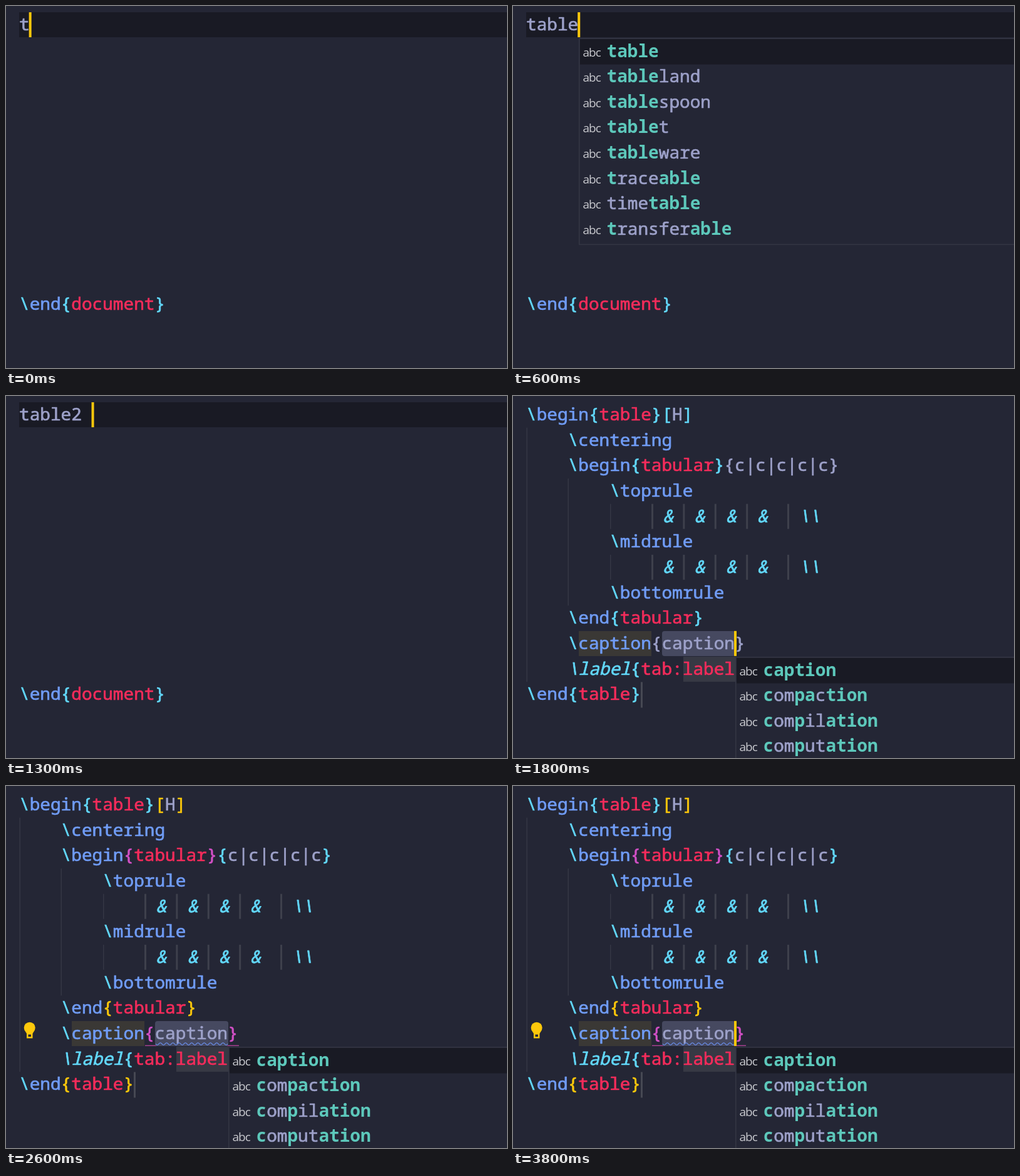
Recreate the animation shown at these times as an HTML page with a canvas. Size 800 by 579 pixels, loop 3.9 s.

```html
<!DOCTYPE html>
<html lang="en">
<head>
<meta charset="utf-8">
<title>Snippet expansion</title>
<style>
html, body { margin: 0; width: 100%; height: 100%; overflow: hidden; background: #242635; }
canvas { display: block; }
</style>
</head>
<body>
<canvas id="stage" width="800" height="579"></canvas>
<script>
const ctx = document.getElementById('stage').getContext('2d');
const LOOP = 3900, LEFT = 21, CELL = 16.65, LINE = 40.65;
const MONO = '27.75px "Noto Sans Mono", "DejaVu Sans Mono", monospace';
const BG = '#242635', DARK = '#191a24', TEXT = '#9da1c9', TEAL = '#5dc8bb', GOLD = '#fdc80b';
const CYAN = '#62d8fa', BLUE = '#709cf6', RED = '#f42c5b', PINK = '#d250c6';
const GUIDE = '#343645', STOP = '#3e404c', ICON = '#c9cacf';

const TYPED = [[0, 't'], [200, 'ta'], [300, 'tab'], [500, 'tabl'], [600, 'table'], [1000, 'table2'], [1200, 'table2 ']];
const POPUP_AT = 100, EXPAND = 1600, SUGGEST = 1700, COLOUR = 2200, LINT = 2400, BLINK = 500;

// Capitals mark the matched letters; a leading * gives the wrench icon.
const HITS = {
  t: 'Table Tableland Tablespoon Tablet Tableware Tabsize *abs Taxicab Traceable Tobacco Timetable Tribal',
  ta: 'TAble TAbleland TAblespoon TAblet TAbleware TAbsize TAxicab TrAceable TobAcco timeTAble TribAl TrAnsferable',
  tab: 'TABle TABleland TABlespoon TABlet TABleware TABsize *ABs TAxicaB TraceABle ToBAcco timeTABle TriBAl',
  tabl: 'TABLe TABLeland TABLespoon TABLet TABLeware TraceABLe timeTABLe TransferABLe',
  table: 'TABLE TABLEland TABLEspoon TABLEt TABLEware TraceABLE timeTABLE TransferABLE',
  caption: 'CAPTION ComPAcTION ComPilATION ComPutATION'
};

// Each piece starts with a colour key; pieces are split by ~.
const END_DOC = 'c\\~bend~c{~rdocument~c}';
const SNIPPET = [
  [0, 'c\\~bbegin~c{~rtable~c}~Y[~tH~Y]'],
  [4, 'c\\~bcentering'],
  [4, 'c\\~bbegin~M{~rtabular~M}~N{~tc|c|c|c|c~N}'],
  [8, 'c\\~btoprule'],
  null,
  [8, 'c\\~bmidrule'],
  null,
  [8, 'c\\~bbottomrule'],
  [4, 'c\\~bend~Y{~rtabular~Y}'],
  [4, 'c\\~bcaption~P{~tcaption~P}'],
  [4, 'C\\~Blabel~c{~rtab:label'],
  [0, 'c\\~bend~Y{~rtable~Y}']
];

const colX = col => LEFT + CELL * col;
const rowY = row => 10 + LINE * row;

function rect(x, y, w, h, fill) {
  ctx.fillStyle = fill;
  ctx.fillRect(x, y, w, h);
}

// Regular and italic text gets a thin outline for a medium weight.
function write(str, x, y, fill, style = '400') {
  ctx.font = style + ' ' + MONO;
  ctx.fillStyle = ctx.strokeStyle = fill;
  ctx.lineWidth = 0.7;
  ctx.lineJoin = 'round';
  ctx.fillText(str, x, y);
  if (style !== '700') ctx.strokeText(str, x, y);
}

function code(row, col, line, coloured) {
  const pick = {
    t: TEXT, c: CYAN, C: CYAN, b: BLUE, B: CYAN, r: RED,
    Y: coloured ? GOLD : CYAN, M: coloured ? PINK : CYAN,
    N: coloured ? CYAN : TEXT, P: coloured ? PINK : TEXT
  };
  for (const piece of line.split('~')) {
    const key = piece[0], str = piece.slice(1);
    write(str, colX(col), rowY(row) + 29, pick[key], 'CB'.includes(key) ? 'italic 400' : '400');
    col += str.length;
  }
}

function cursor(row, col) {
  rect(colX(col) - 1, rowY(row), 4, 40, GOLD);
}

function wrench(x, y) {
  ctx.save();
  ctx.translate(x, y);
  ctx.strokeStyle = ICON;
  ctx.lineWidth = 2;
  ctx.lineJoin = 'round';
  ctx.stroke(new Path2D('M3 20.5L12 12A7.5 7.5 0 0 1 21.5 2.5L17 7L17.5 10.5L21 11L25.5 6.5A7.5 7.5 0 0 1 16 16L7.5 25A3.2 3.2 0 0 1 3 20.5Z'));
  ctx.restore();
}

function abc(x, y) {
  ctx.font = '19px "Open Sans", "Noto Sans", sans-serif';
  ctx.letterSpacing = '-1px';
  ctx.fillStyle = ICON;
  ctx.fillText('abc', x, y);
  ctx.letterSpacing = '0px';
}

function popup(row, col, words) {
  const list = words.split(' ');
  const x = Math.round(colX(col) + 1), y = Math.round(rowY(row + 1));
  const h = list.length * LINE + 6;
  rect(x, y, 800 - x, h, '#343644');
  rect(x + 1.5, y + 1.5, 800 - x, h - 3, BG);
  rect(x + 2, y + 2, 800 - x, 40.5, DARK);
  list.forEach((item, i) => {
    const base = y + 30.5 + i * LINE;
    const word = item.replace('*', '');
    if (word !== item) wrench(x + 7, base - 22);
    else abc(x + 6.5, base - 1);
    [...word].forEach((ch, n) => {
      const hit = ch < 'a';
      write(ch.toLowerCase(), x + 44.5 + n * CELL, base, hit || !i ? TEAL : TEXT, hit ? '700' : '400');
    });
  });
}

function bulb() {
  ctx.fillStyle = GOLD;
  ctx.beginPath();
  ctx.arc(37.7, 386.7, 9, 0, 7);
  ctx.fill();
  ctx.fill(new Path2D('M29.5 390L33 396V403.5H42.5V396L46 390Z'));
  rect(35.5, 397.5, 4.5, 3.5, BG);
}

function squiggle(from, to, y) {
  ctx.beginPath();
  for (let x = from; x <= to; x++) ctx.lineTo(x, y + 1.7 * Math.sin((x - from) * Math.PI / 5));
  ctx.strokeStyle = '#6687dd';
  ctx.lineWidth = 1.3;
  ctx.stroke();
}

function tableRow(row) {
  const y = rowY(row), base = y + 29;
  rect(155, y, 1.5, 40, GUIDE);
  for (let i = 0; i < 4; i++) {
    rect(221 + 50.4 * i, y, 3, 40, STOP);
    write('&', 239.5 + 50.2 * i, base, CYAN, 'italic 400');
  }
  rect(438, y, 3, 40, STOP);
  write('\\\\', 456.5, base, CYAN, 'italic 400');
}

function drawTyping(t) {
  const str = TYPED.filter(step => step[0] <= t).pop()[1];
  rect(LEFT, 10, 779, 40, DARK);
  write(str, LEFT, 39, TEXT);
  code(11, 0, END_DOC);
  if (t >= POPUP_AT && HITS[str]) popup(0, str.length, HITS[str]);
  cursor(0, str.length);
}

function drawSnippet(t) {
  const coloured = t >= COLOUR, linted = t >= LINT;
  rect(21.5, rowY(1), 1.5, LINE * 10, GUIDE);
  rect(87.5, rowY(3), 1.5, LINE * 5, GUIDE);
  rect(105, 376, 116, 40, '#3a3835');
  rect(272, 417, 83, 40, '#373944');
  rect(204, 457.5, 3, 41, '#464853');
  if (coloured) rect(222, 414.5, 150, 1.5, '#a5418f');
  ctx.fillStyle = '#464960';
  ctx.beginPath();
  ctx.roundRect(238, 376, 117, 40, 4);
  ctx.fill();
  SNIPPET.forEach((line, row) => line ? code(row, line[0], line[1], coloured) : tableRow(row));
  if (linted) {
    squiggle(239, 354, 412.5);
    bulb();
  }
  if (t >= SUGGEST) popup(9, 20, HITS.caption);
  if (t < SUGGEST || Math.floor((t - SUGGEST) / BLINK) % 2 === 0) cursor(9, 20);
}

const start = performance.now();

function frame(now) {
  const t = Math.max(0, now - start) % LOOP;
  rect(0, 0, 800, 579, BG);
  if (t < EXPAND) drawTyping(t);
  else drawSnippet(t);
  requestAnimationFrame(frame);
}

requestAnimationFrame(frame);
</script>
</body>
</html>
```
